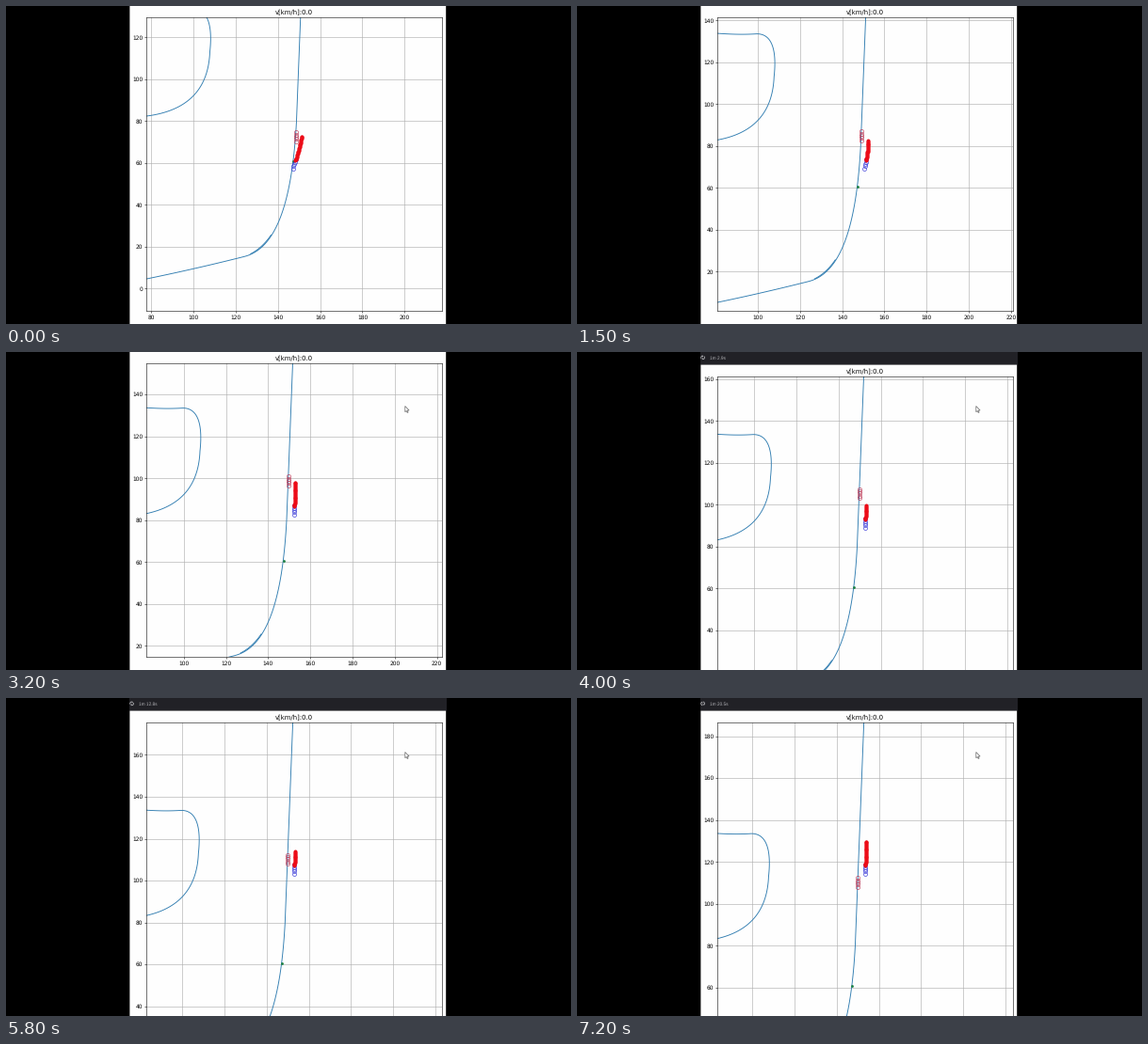
These frames come from a looping animation (600x338 px, 7.3 s). A matplotlib script:

```python
import numpy as np
import matplotlib.pyplot as plt
from matplotlib.animation import FuncAnimation
from matplotlib.lines import Line2D
from matplotlib.patches import Polygon, Rectangle
from matplotlib.ticker import MultipleLocator
from matplotlib.transforms import Affine2D

W, H, DPI = 600, 338, 100
FRAMES, STEP_MS = 73, 100
PX = 72 / DPI              # one pixel in points
HALF = 70                  # half of the visible range, in metres
LEFT, TOP, RIGHT, BOTTOM = 149.4, 12.3, 463.1, 324
SCROLL_FRAME, SCROLL = 36, 14
CURSOR_START, CURSOR_END = 26, 30

plt.rcParams["font.family"] = "DejaVu Sans"
plt.rcParams["text.hinting"] = "none"


def bezier(*points, n=40):
    t = np.linspace(0, 1, n)[:, None]
    layer = [np.array(p, float) for p in points]
    while len(layer) > 1:
        layer = [a + (b - a) * t for a, b in zip(layer, layer[1:])]
    return layer[0].T


def straight_x(y):
    """Road centre on its long straight."""
    return 148.8 + 0.0385 * (y - 81)


def lane_x(y):
    """Path of the car: eases out of the road, then runs beside it."""
    return 152.45 + 0.036 * (y - 85) - 0.0203 * np.maximum(81 - y, 0) ** 1.7


def ego_y(t):
    return 59.4 + 7.92 * t


def other_y(t):
    return min(72.45 + 8.23 * t, 110.2)


def plan_length(i):
    """The plan is used up, then renewed."""
    phase = (i / 4.5) % 1
    return 13.5 - 4.8 * np.clip((phase - 0.12) / 0.55, 0, 1)


road = np.hstack([
    bezier((68, 2.7), (96, 8.2), (124, 15.3)),
    bezier((124, 15.3), (138, 18.8), (146.6, 38), (straight_x(80), 80)),
    [[straight_x(205)], [205]]])
overlap = bezier((127, 16.6), (132.5, 19.4), (136.7, 25.6))
bend = np.hstack([
    bezier((70, 81.8), (97, 82.5), (107, 95), (107.7, 113)),
    bezier((107.7, 113), (108.9, 124), (107.5, 133.6), (99.5, 133.5)),
    bezier((99.5, 133.5), (88, 132.8), (80, 134), (70, 134.4))])

fig = plt.figure(figsize=(W / DPI, H / DPI), dpi=DPI, facecolor="black")
pixels = Affine2D().scale(1 / W, -1 / H).translate(0, 1) + fig.transFigure


def box(x, y, w, h, color, z):
    return fig.add_artist(Rectangle((x, y), w, h, fc=color, ec="none",
                                    transform=pixels, zorder=z, snap=False))


box(131.4, 0, 335.8, H, "#fefefe", -2)
ax = fig.add_axes([0, 0, 1, 1], facecolor="#fefefe")
ax.set_axisbelow(True)
ax.grid(color="#b0b0b0", lw=0.45)
for axis in (ax.xaxis, ax.yaxis):
    axis.set_major_locator(MultipleLocator(20))
ax.tick_params(labelsize=5.9 * PX, length=1.4, width=0.4, pad=1.4)
for spine in ax.spines.values():
    spine.set(linewidth=0.45, color="#202020")
ax.set_title("v[km/h]:0.0", fontsize=6.9 * PX, pad=2.4)

for curve in (road, overlap, bend):
    ax.plot(*curve, color="#2f7cb0", lw=0.65)


def dots(size, **style):
    return ax.plot([], [], "o", ms=size * PX, snap=False, **style)[0]


start = dots(2.8, color="#1b8040", mew=0)
start.set_data([147.4], [60.6])
other = dots(4.2, mfc="none", mec="#b82848", mew=0.5, alpha=0.8)
ego = dots(4, mfc="none", mec="#3a3ad8", mew=0.55, alpha=0.85)
plan = dots(4, color="#ec0c18", mew=0)
body = np.linspace(-2.1, 2.1, 5)

bar = [box(131, 0, 337, 13.6, "#212126", 5)]
clock = fig.text(141, 6, "", transform=pixels, color="#b4b4b8",
                 family="Liberation Sans", fontsize=4.8 * PX,
                 va="center_baseline", zorder=6)
arcs = [fig.add_artist(Line2D([], [], color="#c8c8cc", lw=0.5,
                              transform=pixels, zorder=6)) for _ in range(2)]
bar += [clock, *arcs]

arrow = np.array([(0, 0), (0, 6.2), (1.4, 5), (2.4, 7), (3.3, 6.6),
                  (2.4, 4.6), (4.3, 4.5)])
cursor = fig.add_artist(Polygon(arrow, fc="white", ec="#666666", lw=0.5,
                                transform=pixels, zorder=7))


def draw_bar(i):
    for part in bar:
        part.set_visible(i >= SCROLL_FRAME)
    minutes, seconds = divmod(67.3 + 0.55 * (i - 48), 60)
    clock.set_text(f"{minutes:.0f}m {seconds:.1f}s")
    radius = np.append(np.full(10, 1.9), 0.9)    # ends in a short hook
    for k, arc in enumerate(arcs):
        a = np.linspace(0.3, 2.7, 11) + np.pi * k + 0.37 * i
        arc.set_data(133.6 + radius * np.cos(a), 5.9 + radius * np.sin(a))


def draw_cursor(i):
    cursor.set_visible(i >= CURSOR_START)
    s = np.clip((i - CURSOR_START) / (CURSOR_END - CURSOR_START), 0, 1)
    rest = (1 - s) ** 2
    cursor.set_xy(arrow + (423.8 + 40 * rest, 57.5 + 22 * rest))


def update(i):
    t = i * STEP_MS / 1000
    y = ego_y(t)
    x = lane_x(y)
    down = SCROLL if i >= SCROLL_FRAME else 0
    ax.set_position([LEFT / W, 1 - (BOTTOM + down) / H,
                     (RIGHT - LEFT) / W, (BOTTOM - TOP) / H])
    ax.set_xlim(x - HALF, x + HALF)
    ax.set_ylim(y - HALF, y + HALF)

    ego.set_data(lane_x(y + body), y + body)
    ahead = y + np.arange(1.7, plan_length(i), 0.4)
    plan.set_data(lane_x(ahead), ahead)
    oy = other_y(t)
    other.set_data(np.full(body.size, straight_x(oy) + 0.1), oy + body)

    draw_bar(i)
    draw_cursor(i)
    return []


anim = FuncAnimation(fig, update, frames=FRAMES, interval=STEP_MS,
                     init_func=lambda: update(0), repeat=True, repeat_delay=0,
                     blit=False)
plt.show()
```
